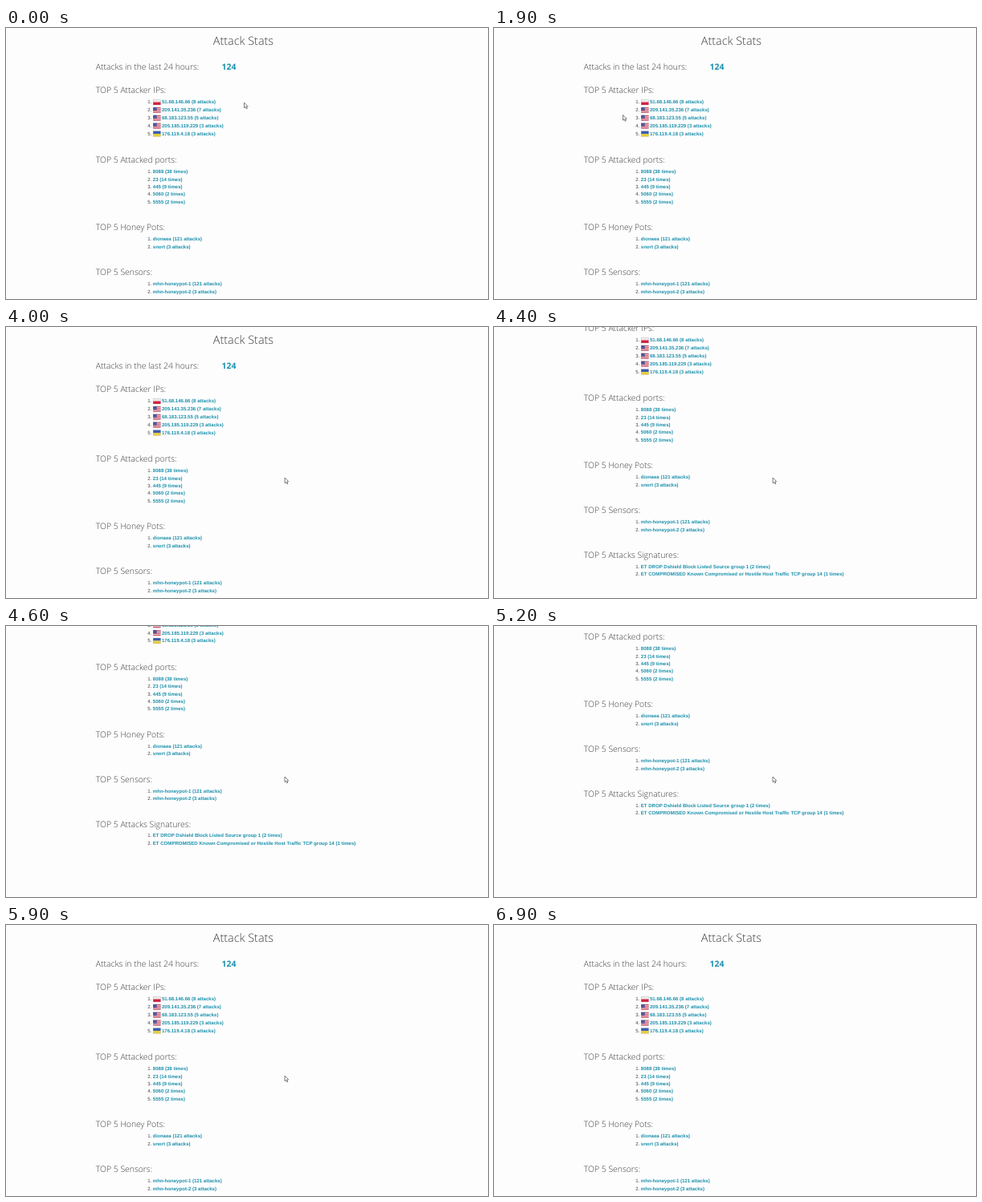
These frames come from a looping animation (600 by 338 pixels, 7000 ms). An HTML page with a canvas:

```html
<!DOCTYPE html>
<html lang="en">
<head>
<meta charset="utf-8">
<title>Attack Stats</title>
<style>
html, body { margin: 0; width: 100%; height: 100%; overflow: hidden; background: #fdfdfe; }
canvas { display: block; }
</style>
</head>
<body>
<canvas id="stage" width="600" height="338"></canvas>
<script>
const ctx = document.getElementById('stage').getContext('2d');
const LOOP = 7000, STEP = 100;
const TEAL = '#1b91ab', INK = '#3c3c3e', PAPER = '#fdfdfe';
const HEAD_FONT = '300 10.4px "Open Sans", sans-serif';
const LINK_FONT = 'bold 6.07px "Liberation Sans", Arial, sans-serif';
const NUMBER_FONT = '6.07px "Liberation Sans", Arial, sans-serif';

// y is the heading baseline, first the baseline of the first list entry
const sections = [
  { title: 'TOP 5 Attacker IPs:', y: 81.3, first: 94.4, pitch: 9.87, items: [
    ['51.68.146.66 (8 attacks)', 'pl'],
    ['209.141.35.236 (7 attacks)', 'us'],
    ['68.183.123.55 (5 attacks)', 'us'],
    ['205.185.119.229 (3 attacks)', 'us'],
    ['176.119.4.18 (3 attacks)', 'ua']] },
  { title: 'TOP 5 Attacked ports:', y: 168.3, first: 181.1, pitch: 9.45, items: [
    ['8088 (38 times)'], ['23 (14 times)'], ['445 (9 times)'],
    ['5060 (2 times)'], ['5555 (2 times)']] },
  { title: 'TOP 5 Honey Pots:', y: 252.3, first: 265.2, pitch: 9.45, items: [
    ['dionaea (121 attacks)'], ['snort (3 attacks)']] },
  { title: 'TOP 5 Sensors:', y: 308.3, first: 321.1, pitch: 9.45, items: [
    ['mhn-honeypot-1 (121 attacks)'], ['mhn-honeypot-2 (3 attacks)']] },
  { title: 'TOP 5 Attacks Signatures:', y: 364.3, first: 376.8, pitch: 9.45, items: [
    ['ET DROP Dshield Block Listed Source group 1 (2 times)'],
    ['ET COMPROMISED Known Compromised or Hostile Host Traffic TCP group 14 (1 times)']] }
];

// [time, value...]
const scrollKeys = [[0, 0], [4000, 0], [4400, 76], [4800, 151], [5200, 151], [5600, 68], [5900, 0]];
const pointerKeys = [
  [0, 296, 92.5], [100, 309, 98], [200, 309, 98], [500, 352, 136], [600, 385, 160],
  [700, 394, 150], [900, 345, 110], [1000, 312, 100], [1100, 297, 98], [1200, 315, 101],
  [1300, 360, 100], [1400, 405, 94], [1500, 436, 90], [1600, 436, 90], [1700, 350, 98],
  [1800, 250, 106], [1900, 160, 108], [2200, 8, 115], [2400, 45, 130], [3200, 285, 195],
  [3600, 363, 194], [4000, 346.5, 187.5], [5900, 346.5, 187.5], [6300, 466, 340]
];

function sample(keys, t) {
  const next = keys.findIndex(k => k[0] > t);
  if (next < 0) return keys[keys.length - 1].slice(1);
  const a = keys[next - 1], b = keys[next];
  const p = (t - a[0]) / (b[0] - a[0]);
  return a.slice(1).map((v, i) => v + (b[i + 1] - v) * p);
}

function text(str, x, y, font, color) {
  ctx.font = font;
  ctx.fillStyle = color;
  ctx.fillText(str, x, y);
}

function rect(x, y, w, h, color) {
  ctx.fillStyle = color;
  ctx.fillRect(x, y, w, h);
}

function flag(kind, x, y) {
  const w = 9.3, h = 6.8;
  if (kind === 'pl') {
    rect(x, y, w, h / 2, '#eeeaeb');
    rect(x, y + h / 2, w, h / 2, '#d51f3c');
  } else if (kind === 'ua') {
    rect(x, y, w, h / 2, '#3c5bb0');
    rect(x, y + h / 2, w, h / 2, '#e6cf3c');
  } else {
    rect(x, y, w, h, '#efd9df');
    for (let i = 0; i < 4; i++) rect(x, y + i * h * 2 / 7, w, h / 7, '#cf4259');
    rect(x, y, w * 0.48, h * 4 / 7, '#4a559b');
  }
  ctx.strokeStyle = 'rgba(90, 80, 100, .3)';
  ctx.lineWidth = 0.5;
  ctx.strokeRect(x, y, w, h);
}

function page() {
  text('Attack Stats', 257.8, 21, '300 14.4px "Open Sans", sans-serif', INK);
  text('Attacks in the last 24 hours:', 111.8, 51.8, HEAD_FONT, INK);
  text('124', 268.6, 51.8, 'bold 10.4px "Open Sans", sans-serif', TEAL);
  for (const s of sections) {
    text(s.title, 111.8, s.y, HEAD_FONT, INK);
    s.items.forEach(([label, country], i) => {
      const y = s.first + i * s.pitch;
      text(i + 1 + '.', 176.3, y, NUMBER_FONT, '#444');
      if (country) flag(country, 183.2, y - 5.3);
      text(label, country ? 194 : 182.8, y, LINK_FONT, TEAL);
    });
  }
}

function pointer(x, y) {
  ctx.save();
  ctx.translate(x + 0.5, y + 0.5);
  ctx.beginPath();
  [[0, 0], [0, 6.6], [1.6, 5.3], [2.7, 7.8], [3.8, 7.3], [2.8, 4.9], [4.7, 4.8]]
    .forEach(p => ctx.lineTo(...p));
  ctx.closePath();
  ctx.fillStyle = '#fff';
  ctx.fill();
  ctx.strokeStyle = '#555';
  ctx.lineWidth = 0.75;
  ctx.stroke();
  ctx.restore();
}

function draw(now) {
  const t = Math.floor((now % LOOP) / STEP) * STEP;
  ctx.textRendering = 'geometricPrecision';
  rect(0, 0, 600, 338, PAPER);
  ctx.save();
  ctx.translate(0, -sample(scrollKeys, t)[0]);
  page();
  ctx.restore();
  pointer(...sample(pointerKeys, t));
}

let start;
function frame(now) {
  start ??= now;
  draw(now - start);
  requestAnimationFrame(frame);
}
draw(0);
requestAnimationFrame(frame);
</script>
</body>
</html>
```
